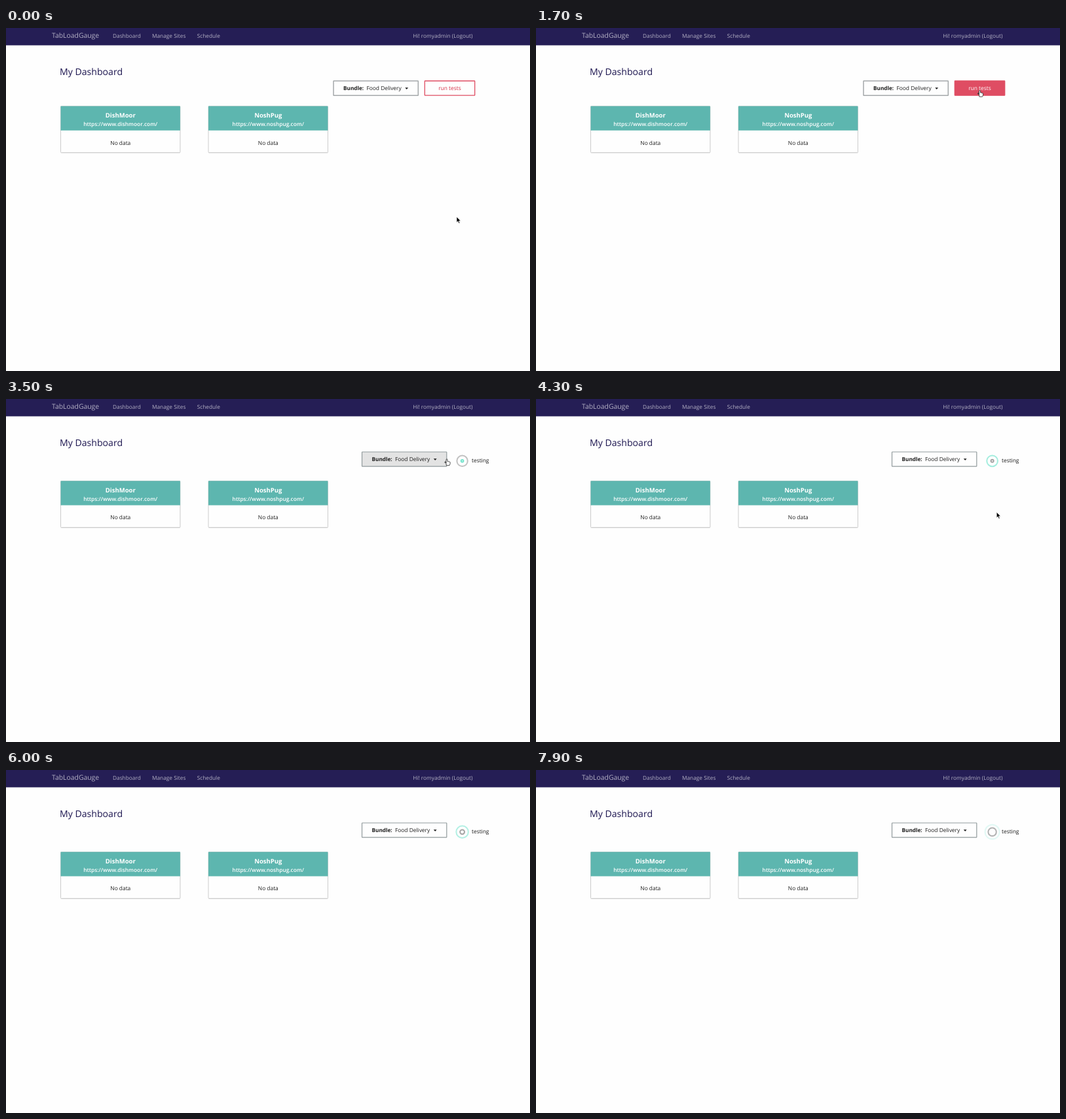
An HTML page for the animation above (8 s loop, 800 px wide and 525 px high).

```html
<!DOCTYPE html>
<html lang="en">
<head>
<meta charset="utf-8">
<title>My Dashboard</title>
<style>
  html, body { margin: 0; width: 100%; height: 100%; overflow: hidden; background: #fefefe; }
  svg { display: block; width: 800px; height: 525px; }
  text { font-family: "Open Sans", "Noto Sans", sans-serif; font-size: 8.4px; fill: #1c1c1c; text-rendering: geometricPrecision; }
  .nav text { fill: #b3b0c4; font-size: 8.3px; }
  .nav .brand { font-size: 10.4px; }
  .mid { text-anchor: middle; }
  .bold { font-weight: 700; }
</style>
</head>
<body>
<svg viewBox="0 0 800 525">
  <rect width="800" height="525" fill="#fefefe"/>
  <g class="nav">
    <rect width="800" height="26.5" fill="#251e55"/>
    <text class="brand" x="70" y="15.3">TabLoadGauge</text>
    <text x="163" y="14.7">Dashboard</text>
    <text x="223" y="14.7">Manage Sites</text>
    <text x="291.7" y="14.7">Schedule</text>
    <text x="712.5" y="14.7" text-anchor="end">Hi! romyadmin (Logout)</text>
  </g>
  <text x="82" y="72.3" style="font-size:14.1px;fill:#1d1650">My Dashboard</text>

  <g id="cards"></g>

  <g id="bundle">
    <rect id="box" x="500" y="81" width="129.3" height="22.2" rx=".5"/>
    <text class="bold" x="515" y="95" style="font-size:8.2px">Bundle:</text>
    <text x="550.4" y="95">Food Delivery</text>
    <path d="M609.3 91.3h4.8l-2.4 2.6z" fill="#1c1c1c"/>
  </g>

  <g id="run">
    <rect id="glow" x="637.9" y="79.9" width="79" height="24.4" rx="1.5" fill="#b5cdd0"/>
    <rect id="btn" x="639.3" y="81" width="76.4" height="22.2" rx=".5" stroke-width="1.3"/>
    <text id="label" class="mid" x="677.4" y="95">run tests</text>
  </g>

  <g id="wait">
    <g fill="none" stroke-width="2">
      <circle id="teal" cx="696.6" cy="94.8" stroke="#74e4cd"/>
      <circle id="gray" cx="696.6" cy="94.8" stroke="#a3a3a3"/>
    </g>
    <text x="711" y="97.3">testing</text>
  </g>

  <path id="arrow" d="M0 0V8.6L2 6.8 3.4 10 4.9 9.4 3.5 6.3H6.1Z" fill="#000" stroke="#fff" stroke-width=".6"/>
  <path id="hand" d="M-1 .5Q0-.7 1 .5V3.6Q2 3 2.6 3.9 3.5 3.4 4 4.3 5 4 5.2 5.2 5.2 8 4 9.7H-.6Q-2-.0 -3.2 5.6 -2.6 4.4-1 6Z" fill="#fff" stroke="#222" stroke-width=".8" stroke-linejoin="round"/>
</svg>
<script>
const LOOP = 8000, STEP = 100;
const PRESS = 2700, START = 3000;
const RIPPLE = 1560, RIPPLE_ZERO = 3391, MAX_R = 11.5;
const RED = [223, 77, 99], SEA = [90, 154, 160], WHITE = [254, 254, 254], INK = [215, 45, 68];

// Pointer stops: time, x, y
const stops = [
  [100, 688, 289], [1300, 677.5, 95.5], [1800, 677.5, 95.5],
  [2100, 673, 92], [3700, 673, 92], [4400, 705, 178], [4800, 812, 168]
];

const $ = id => document.getElementById(id);
const clamp = v => Math.max(0, Math.min(1, v));
const smooth = v => v * v * (3 - 2 * v);
const mix = (a, b, k) => `rgb(${a.map((v, i) => Math.round(v + (b[i] - v) * k))})`;
const show = (id, on) => $(id).setAttribute("display", on ? "inline" : "none");
const set = (id, attrs) => { for (const k in attrs) $(id).setAttribute(k, attrs[k]); };

function card(x, name, url) {
  const c = x + 91.3;
  return `<rect x="${x}" y="120" width="182.6" height="71.6" rx="1" fill="#ddd"/>
    <rect x="${x}" y="119.7" width="182.4" height="71" rx="1" fill="#fefefe" stroke="#ccc"/>
    <rect x="${x}" y="119.6" width="182.4" height="37.2" fill="#5db6af"/>
    <g class="mid"><g class="bold">
    <text x="${c}" y="137" style="font-size:9.5px;fill:#fff">${name}</text>
    <text x="${c}" y="150.2" style="font-size:8.3px;font-weight:600;fill:#fff">${url}</text></g>
    <text x="${c}" y="178.7">No data</text></g>`;
}
$("cards").innerHTML =
  card(83.5, "DishMoor", "https://www.dishmoor.com/") +
  card(309, "NoshPug", "https://www.noshpug.com/");

function pointer(t) {
  let i = 0;
  while (i < stops.length - 2 && t > stops[i + 1][0]) i++;
  const [t0, x0, y0] = stops[i], [t1, x1, y1] = stops[i + 1];
  const k = smooth(clamp((t - t0) / (t1 - t0)));
  return [x0 + (x1 - x0) * k, y0 + (y1 - y0) * k];
}

// Cubic ease with handles (0, .2) and (.8, 1)
function grow(p) {
  let lo = 0, hi = 1, s = .5;
  for (let i = 0; i < 20; i++) {
    s = (lo + hi) / 2;
    if (2.4 * (1 - s) * s * s + s * s * s < p) lo = s; else hi = s;
  }
  return .6 * (1 - s) ** 2 * s + 3 * (1 - s) * s * s + s ** 3;
}

function ring(id, p) {
  set(id, { r: MAX_R * grow(p), opacity: 1 - p * p });
}

function draw(t) {
  const testing = t >= START;
  const [x, y] = pointer(t);
  const overBtn = !testing && y < 104;
  const overBox = testing && x < 674 && y < 104;

  set("cards", { transform: `translate(0 ${testing ? 5.8 : 0})` });
  set("bundle", { transform: `translate(${testing ? 43.5 : 0} 0)` });
  set("box", {
    fill: overBox ? "#e3e3e3" : "#fefefe",
    stroke: testing ? "#929b9d" : "#a4a8aa",
    "stroke-width": testing ? 1.2 : 1.5
  });

  show("run", !testing);
  show("glow", t >= PRESS);
  const pressed = clamp((t - PRESS + 50) / 150);
  const face = mix(RED, SEA, pressed);
  set("btn", { fill: overBtn ? face : mix(WHITE, WHITE, 0), stroke: face });
  $("label").style.fill = overBtn ? "#fff" : mix(INK, INK, 0);
  $("label").style.fontWeight = overBtn ? 500 : 400;

  show("wait", testing);
  const phase = ((t - RIPPLE_ZERO) / RIPPLE + 4) % 1;
  ring("teal", phase);
  ring("gray", (phase + .5) % 1);

  const hand = overBtn || overBox;
  show("hand", hand);
  show("arrow", !hand && x < 806);
  set(hand ? "hand" : "arrow", { transform: `translate(${x} ${y})` });
}

function tick(now) {
  draw(Math.floor((now % LOOP) / STEP) * STEP);
  requestAnimationFrame(tick);
}
draw(0);
requestAnimationFrame(tick);
</script>
</body>
</html>
```
